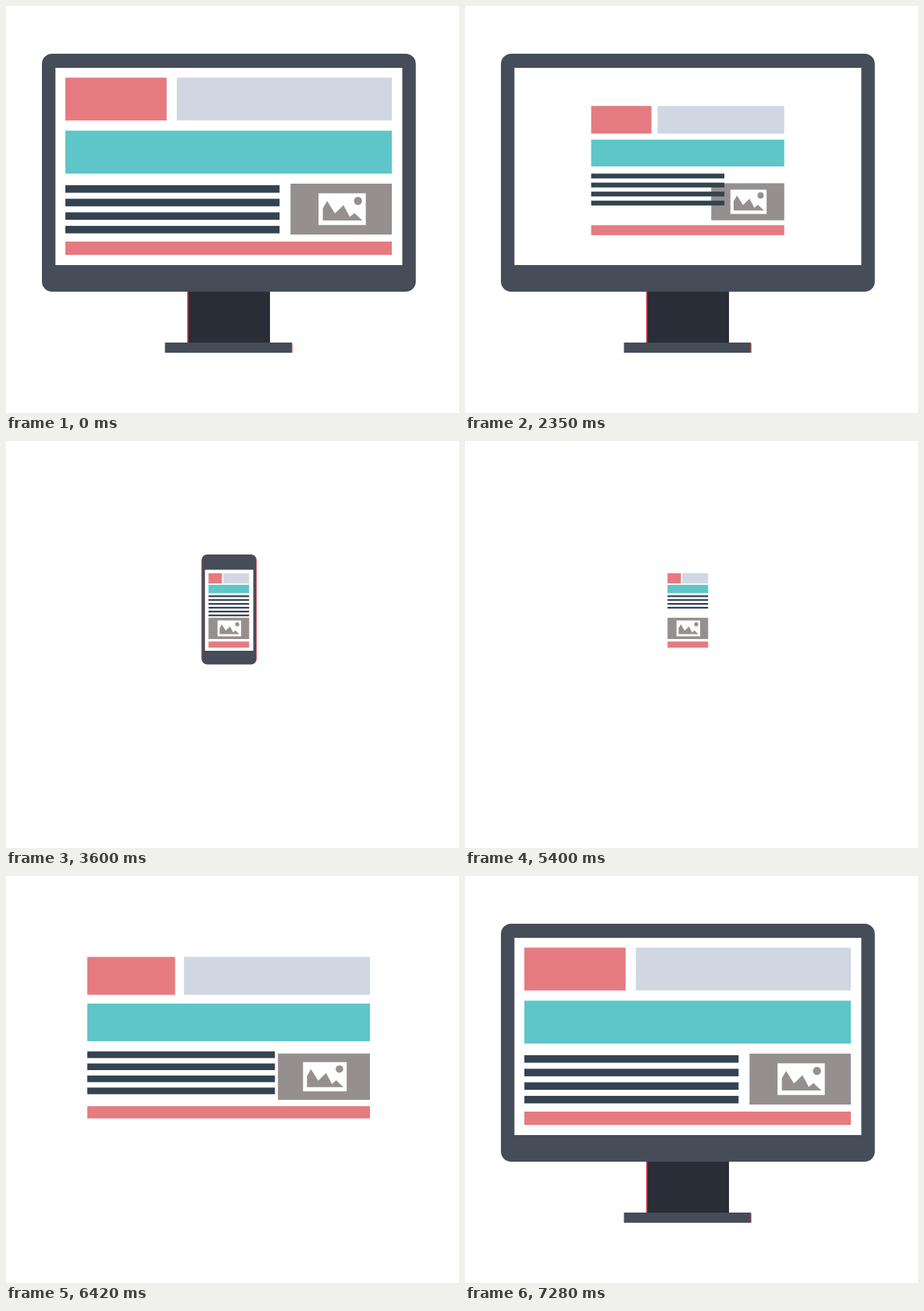
Animation, 580 px wide and 520 px high, one loop 7360 ms. Source, as an HTML page with a canvas:

```html
<!DOCTYPE html>
<html lang="en">
<head>
<meta charset="utf-8">
<title>Responsive layout</title>
<style>
  html, body { margin: 0; width: 100%; height: 100%; overflow: hidden; background: #fff; }
  canvas { display: block; width: 580px; height: 520px; }
</style>
</head>
<body>
<canvas id="stage" width="580" height="520"></canvas>
<script>
const ctx = document.getElementById('stage').getContext('2d');

const LOOP = 7360, STEP = 78.33;
const SHRINK_AT = 1880, GROW_AT = 5400;
const RED = '#e57b80', BLUE = '#d1d7e2', TEAL = '#5ec5c9', INK = '#334351';
const GRAY = '#968f90', SHELL = '#464c58', STAND = '#282d38', FRINGE = '#d8434f';

// Page metrics for both devices; everything else follows from them
const PHONE = {
  left: 259.3, width: 52, top: 169, gap: 1.7, logo: 17.2, header: 13, banner: 10.8,
  line: 52, lineTop: 197.2, pitch: 4.9, thick: 2.2,
  photo: 52, photoTop: 225.8, photoHeight: 27.2, iconScale: 0.5, footerGap: 3.2, footer: 7.8
};
const DESKTOP = {
  left: 76, width: 418, top: 91.5, gap: 13, logo: 129.7, header: 54.8, banner: 54.8,
  line: 274.3, lineTop: 229, pitch: 17.3, thick: 9.6,
  photo: 129.7, photoTop: 227, photoHeight: 65, iconScale: 1, footerGap: 9, footer: 17
};

const clamp = v => Math.max(0, Math.min(1, v));

function blend(a, b, p) {
  return Object.fromEntries(Object.keys(a).map(key => [key, a[key] + (b[key] - a[key]) * p]));
}

function box(x, y, w, h, color) {
  ctx.fillStyle = color;
  ctx.fillRect(x, y, w, h);
}

// Rounded case with a hole for the screen
function shell(x, y, w, h, radius, side, head, screenHeight) {
  ctx.beginPath();
  ctx.roundRect(x, y, w, h, radius);
  ctx.rect(x + side, y + head, w - 2 * side, screenHeight);
  ctx.fillStyle = SHELL;
  ctx.fill('evenodd');
}

function drawMonitor() {
  box(232, 360, 106, 70, STAND);
  box(232, 365, 1.5, 65, FRINGE);
  shell(46, 61, 478.7, 304, 13, 17.3, 18, 252);
  box(203.5, 430, 162.5, 13, SHELL);
  box(365.7, 431, 1, 12, FRINGE);
}

function drawPhone() {
  shell(250.5, 145, 70.3, 140.5, 7, 4.2, 19.5, 103.5);
  for (const x of [250.4, 320]) box(x, 151, 0.8, 129, FRINGE);
  drawLines(PHONE, 4, 6);
}

function drawLines(m, from, to) {
  for (let i = from; i < to; i++) box(m.left, m.lineTop + i * m.pitch, m.line, m.thick, INK);
}

function drawIcon(x, y, scale) {
  ctx.save();
  ctx.translate(x, y);
  ctx.scale(scale, scale);
  box(-30, -20.2, 60.5, 40.5, '#fff');
  ctx.fillStyle = GRAY;
  ctx.fill(new Path2D('M-24.5 14.5V-1L-19-10.5-9 5.5 2-5 10 10 16 5 26 14.5Z'));
  ctx.beginPath();
  ctx.arc(20.5, -10.5, 5.2, 0, Math.PI * 2);
  ctx.fill();
  ctx.restore();
}

function drawContent(m) {
  const right = m.left + m.width;
  const blueLeft = m.left + m.logo + m.gap;
  const photoLeft = right - m.photo;
  const photoBottom = m.photoTop + m.photoHeight;
  box(m.left, m.top, m.logo, m.header, RED);
  box(blueLeft, m.top, right - blueLeft, m.header, BLUE);
  box(m.left, m.top + m.header + m.gap, m.width, m.banner, TEAL);
  box(photoLeft, m.photoTop, m.photo, m.photoHeight, GRAY);
  drawIcon(photoLeft + m.photo / 2 + m.iconScale, m.photoTop + m.photoHeight / 2, m.iconScale);
  drawLines(m, 0, 4);
  box(m.left, photoBottom + m.footerGap, m.width, m.footer, RED);
}

function withAlpha(alpha, draw) {
  if (alpha <= 0) return;
  ctx.globalAlpha = alpha;
  draw();
  ctx.globalAlpha = 1;
}

// Number of animation steps shown since a phase began
const stepsSince = (t, start) => Math.floor((t - start + 5) / STEP) + 1;

function poseAt(t) {
  if (t < GROW_AT) {
    const n = t < SHRINK_AT ? 0 : stepsSince(t, SHRINK_AT);
    const fade = clamp((n - 15) / 8);
    return { size: 1 - clamp(n / 15), monitor: 1 - fade, phone: fade };
  }
  const n = stepsSince(t, GROW_AT);
  return { size: clamp((n - 1.3) / 15), monitor: clamp((n - 16.5) / 8.3), phone: 0 };
}

function render() {
  const { size, monitor, phone } = poseAt(performance.now() % LOOP);
  box(0, 0, 580, 520, '#fff');
  withAlpha(monitor, drawMonitor);
  withAlpha(phone, drawPhone);
  drawContent(blend(PHONE, DESKTOP, size));
  requestAnimationFrame(render);
}
render();
</script>
</body>
</html>
```
